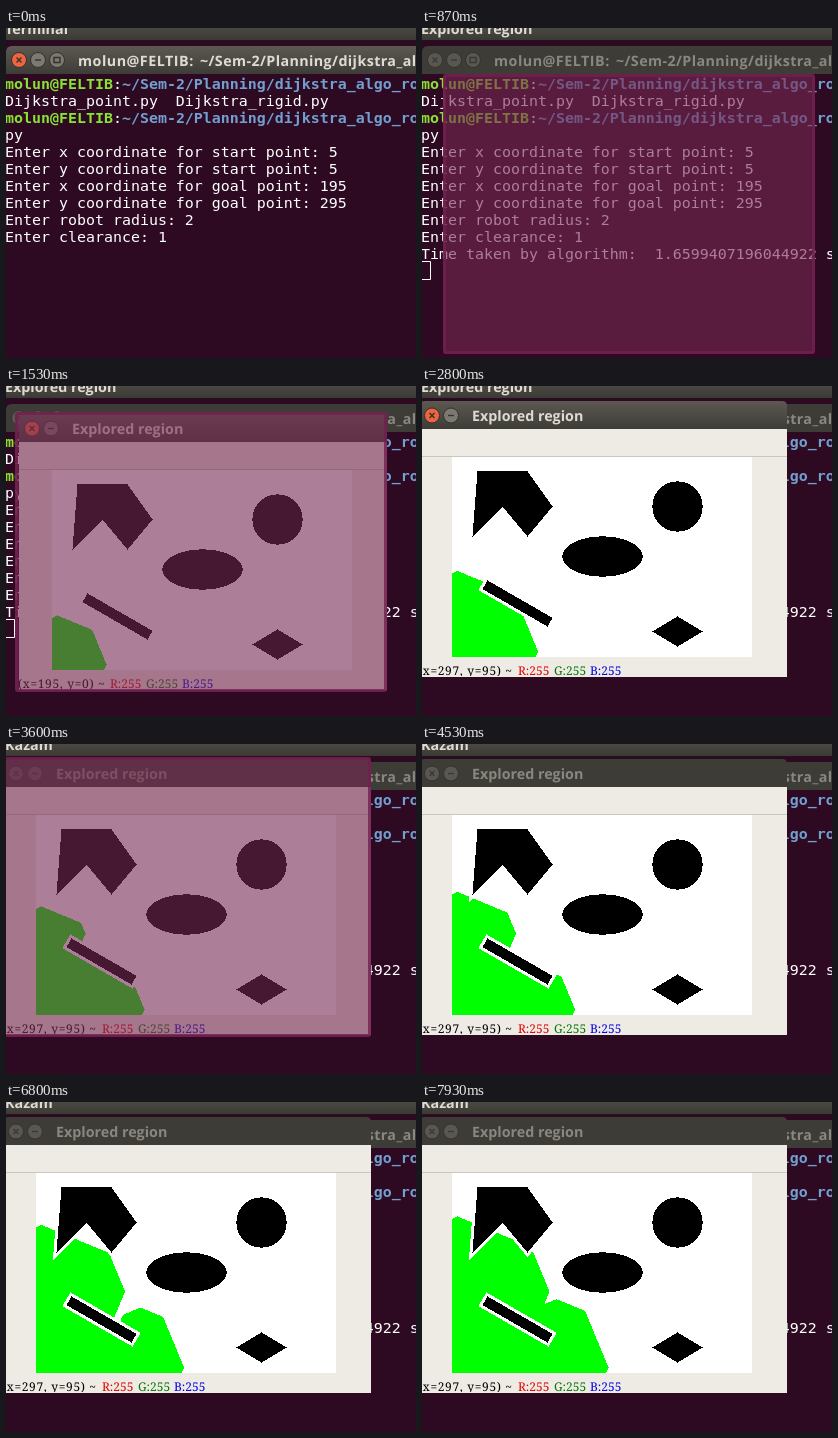
Write an HTML page that moves like this. It is 410 px wide and 330 px high and loops after 8000 ms.

```html
<!DOCTYPE html>
<html lang="en">
<head>
<meta charset="utf-8">
<title>Explored region</title>
<style>
  html, body { margin: 0; width: 100%; height: 100%; overflow: hidden; background: #2d0a22; }
  svg { display: block; }
  text { white-space: pre; }
  .ui { font: 700 14.3px "Open Sans", "Noto Sans", sans-serif; fill: #dfdbd2; text-rendering: geometricPrecision; }
  .mono { font: 14.95px "DejaVu Sans Mono", monospace; fill: #fff; }
  .user { font-weight: 700; fill: #8ae234; }
  .path { font-weight: 700; fill: #729fcf; }
  .status { font: 12px "Noto Serif", serif; text-rendering: geometricPrecision; }
  .wide { letter-spacing: .65px; }
  .bar { fill: #3d3c37; }
  .frame .ui { fill: #8a877f; }
  .frame .btn { fill: #595750; stroke: #34332f; }
  .frame .glyph { fill: none; stroke: #3a3934; stroke-width: 1.4; }
  .on .bar { fill: url(#bar); }
  .on .ui { fill: #dfdbd2; }
  .on .btn { fill: #7b7970; stroke: #33322e; }
  .on .close { fill: #ea6540; }
  .on .glyph { stroke: #3a2f29; }
</style>
</head>
<body>
<svg id="stage" width="410" height="330" viewBox="0 0 410 330">
  <defs>
    <linearGradient id="bar" x2="0" y2="1">
      <stop offset="0" stop-color="#5b5951"/><stop offset="1" stop-color="#3d3c37"/>
    </linearGradient>
    <linearGradient id="panel" x2="0" y2="1">
      <stop offset="0" stop-color="#4a4842"/><stop offset="1" stop-color="#3b3a35"/>
    </linearGradient>
    <clipPath id="body"><path d="M-3 16H365V290H-3Z"/></clipPath>
  </defs>
  <rect width="410" height="330" fill="#2d0a22"/>

  <g id="term" class="frame">
    <path class="bar" d="M0 46V24q0-6 6-6H410V46Z"/>
    <g id="termButtons"></g>
    <text class="ui" x="72" y="38" letter-spacing=".5">molun@FELTIB:</text>
    <text class="ui" x="194" y="38" letter-spacing=".4">~/Sem-2/Planning/dijkstra_algo</text>
  </g>
  <g id="lines"></g>
  <g id="result">
    <text class="mono" x="-1" y="231">Time taken by algorithm:  1.6599407196044922 s</text>
    <path d="M-.5 233.5H8.5V251.5H-.5Z" fill="none" stroke="#fff"/>
  </g>

  <g id="win" class="frame">
    <path d="M-3 43H365V291H-3Z" fill="#eeebe5"/>
    <path class="bar" d="M-3 43V21q0-6 6-6H360q5 0 5 5V43Z"/>
    <g id="winButtons"></g>
    <text class="ui" x="50" y="35">Explored region</text>
    <path d="M-3 70.5H365" stroke="#cbc7bf"/>
    <g transform="translate(30 71)" shape-rendering="crispEdges">
      <rect width="300" height="200" fill="#fff"/>
      <path id="seen" fill="#0f0"/>
      <path id="walls"/>
    </g>
    <g clip-path="url(#body)" class="status">
      <text id="coords" class="wide" x="-4" y="289"></text>
      <g id="rgb">
        <text x="96" y="289" fill="#e00000">R:255</text>
        <text x="132" y="289" fill="#007a00">G:255</text>
        <text x="168" y="289" fill="#0000e0">B:255</text>
      </g>
    </g>
  </g>

  <g id="tint">
    <rect x="-7" y="13" width="372" height="280" rx="3" fill="#772953" fill-opacity=".6"/>
    <rect x="-5.5" y="14.5" width="369" height="277" rx="2" fill="none"
          stroke="#741f50" stroke-width="3" stroke-opacity=".8"/>
  </g>

  <rect width="410" height="12" fill="url(#panel)"/>
  <rect y="12" width="410" height="1" fill="#25101d"/>
  <text id="app" class="ui" x="-1" y="6"></text>
</svg>
<script>
const $ = id => document.getElementById(id);
const LOOP = 8000, W = 300, H = 200, START = { x: 5, y: 194 }, GAP = 3;

const WALLS = "M25 15H75L100 50 75 80 50 50 20 80Z" +
  "M30 132.5 35 124 100 161.4 95 170Z" +
  "M225 160 250 175 225 190 200 175Z" +
  "M200 50a25 25 0 1 0 50 0a25 25 0 1 0-50 0Z" +
  "M110 100a40 20 0 1 0 80 0a40 20 0 1 0-80 0Z";

const PROMPT = '<tspan class="user">molun@FELTIB</tspan>:' +
  '<tspan class="path">~/Sem-2/Planning/dijkstra_algo_ro</tspan>';
const LINES = [
  PROMPT,
  "Dijkstra_point.py  Dijkstra_rigid.py",
  PROMPT,
  "py",
  "Enter x coordinate for start point: 5",
  "Enter y coordinate for start point: 5",
  "Enter x coordinate for goal point: 195",
  "Enter y coordinate for goal point: 295",
  "Enter robot radius: 2",
  "Enter clearance: 1"
];

const GLYPHS = ["M-2.5-2.5 2.5 2.5M2.5-2.5-2.5 2.5", "M-3 0H3", "M-3-2.5H3V2.5H-3Z"];
const buttons = (x, y, count) => GLYPHS.slice(0, count).map((d, i) =>
  `<g transform="translate(${x + 19 * i} ${y})">
    <circle class="btn ${i ? "" : "close"}" r="7.5"/><path class="glyph" d="${d}"/></g>`).join("");

// Cells covered by the obstacles, grown by a margin; map row 0 is at the bottom
function wallMask(margin) {
  const ctx = document.createElement("canvas").getContext("2d"), shape = new Path2D(WALLS);
  ctx.lineWidth = 2 * margin + 0.1;
  return Array.from({ length: W * H }, (_, i) => {
    const x = i % W, y = Math.floor(i / W) + 1;
    return ctx.isPointInPath(shape, x, y) || ctx.isPointInStroke(shape, x, y);
  });
}

// Shortest 8-way distance to every free cell, by repeated sweeps
function distances(blocked) {
  const cost = new Float64Array(W * H).fill(1e9);
  cost[START.y * W + START.x] = 0;
  for (let pass = 0, changed = true; changed && pass < 60; pass++) {
    changed = false;
    for (let k = 0; k < W * H; k++) {
      const i = pass % 2 ? W * H - 1 - k : k;
      if (blocked[i]) continue;
      const x = i % W, y = (i - x) / W;
      for (let dy = -1; dy <= 1; dy++) for (let dx = -1; dx <= 1; dx++) {
        const nx = x + dx, ny = y + dy;
        if (nx < 0 || ny < 0 || nx >= W || ny >= H) continue;
        const c = cost[ny * W + nx] + Math.hypot(dx, dy);
        if (c < cost[i] - 1e-9) {
          cost[i] = c;
          changed = true;
        }
      }
    }
  }
  return cost;
}

// Path of horizontal runs over the chosen cells
function cellPath(chosen) {
  let d = "";
  for (let y = 0; y < H; y++) {
    let from = -1;
    for (let x = 0; x <= W; x++) {
      const inside = x < W && chosen(y * W + x);
      if (inside && from < 0) from = x;
      if (!inside && from >= 0) {
        d += `M${from} ${y}h${x - from}v1H${from}z`;
        from = -1;
      }
    }
  }
  return d;
}

// Linear interpolation through [time, value] pairs
function track(keys, t) {
  const n = keys.findIndex(k => k[0] > t);
  if (n === 0) return keys[0][1];
  if (n < 0) return keys[keys.length - 1][1];
  const [t0, a] = keys[n - 1], [t1, b] = keys[n];
  return a + (b - a) * (t - t0) / (t1 - t0);
}

const REACH = [[870, 0], [1530, 49], [2800, 80.5], [3600, 103], [5730, 134], [7930, 151], [8000, 151.5]]
  .map(([t, r]) => [t, r * r]);
const LEFT = [[930, 28], [1400, 16], [1760, 16], [2200, 0]];
const DOWN = [[930, 33], [1400, 13], [1760, 13], [2200, 0]];
const TINT = [[600, 0], [800, 1], [1950, 1], [2250, 0], [3300, 0], [3500, 1], [3750, 1], [4050, 0]];
const SHOW = [[900, 0], [1150, 1]];

function render(t) {
  const early = t < 2000, reach = Math.sqrt(track(REACH, t));
  const move = `translate(${track(LEFT, t)} ${track(DOWN, t)})`;
  $("app").textContent = t < 600 ? "Terminal" : t < 3400 ? "Explored region" : "Kazam";
  $("term").classList.toggle("on", t < 600);
  $("win").classList.toggle("on", t < 3400);
  $("result").style.display = t < 400 ? "none" : "";
  $("win").setAttribute("transform", move);
  $("win").setAttribute("opacity", track(SHOW, t));
  $("tint").setAttribute("transform", move);
  $("tint").setAttribute("opacity", track(TINT, t));
  $("coords").textContent = early ? "(x=195, y=0) ~" : "(x=297, y=95) ~";
  $("rgb").setAttribute("transform", `translate(${early ? -8 : 0} 0)`);
  $("seen").setAttribute("d", cellPath(i => cost[i] <= reach));
}

$("lines").innerHTML = LINES.map((s, i) =>
  `<text class="mono" x="-1" y="${61 + 17 * i}">${s}</text>`).join("");
$("termButtons").innerHTML = buttons(13, 32, 3);
$("winButtons").innerHTML = buttons(10, 29.5, 2);

const walls = wallMask(0);
$("walls").setAttribute("d", cellPath(i => walls[i]));
const cost = distances(wallMask(GAP));

const begin = performance.now();
function tick() {
  render((performance.now() - begin) % LOOP);
  requestAnimationFrame(tick);
}
tick();
</script>
</body>
</html>
```
